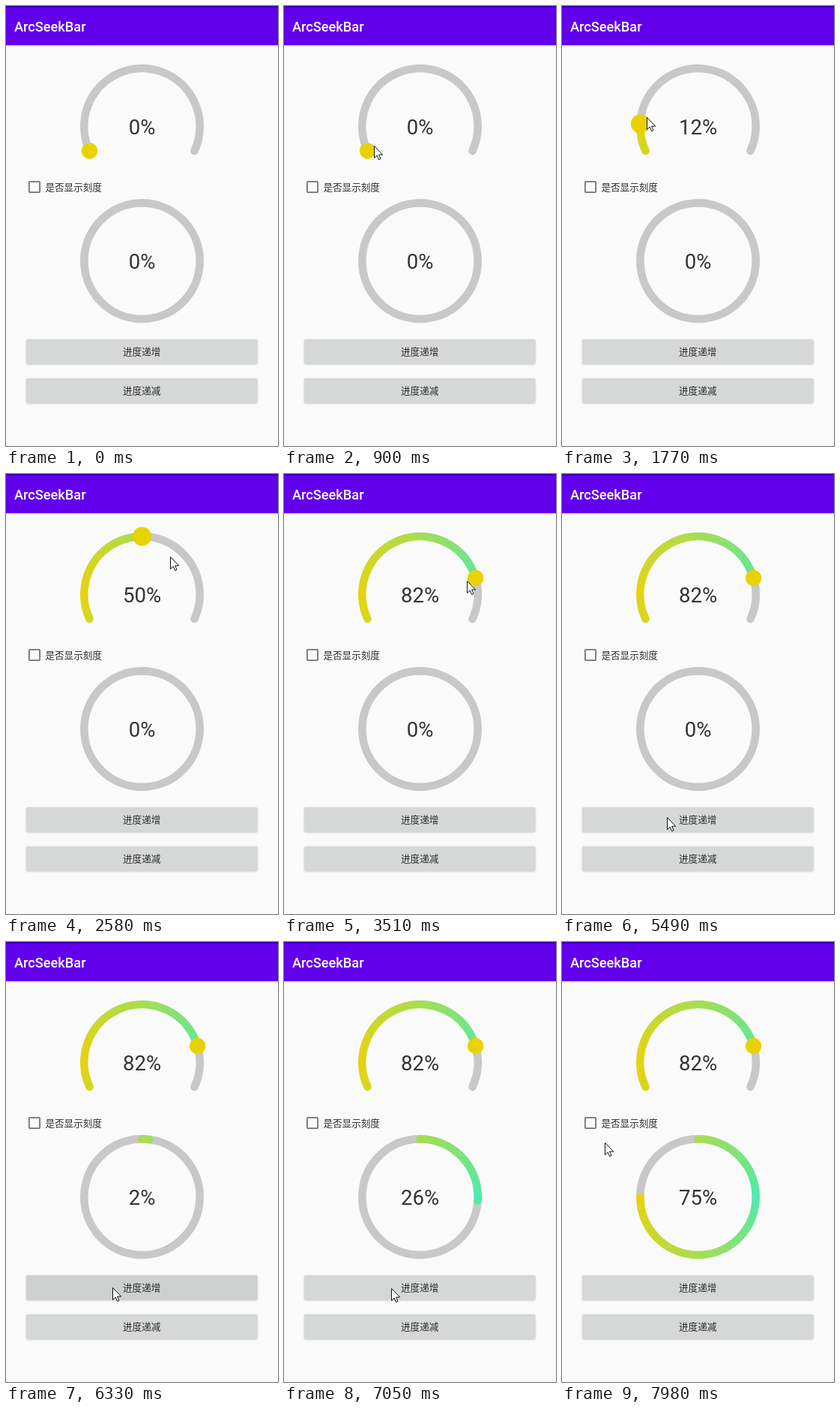
An HTML page with a canvas that plays this animation: 363x586 px, repeating every 8 s.

```html
<!DOCTYPE html>
<html lang="zh-CN">
<head>
<meta charset="utf-8">
<title>ArcSeekBar</title>
<style>
  html, body { margin: 0; width: 100%; height: 100%; overflow: hidden; background: #fafafa; }
  canvas, svg { position: absolute; left: 0; top: 0; width: 363px; height: 586px; display: block; }
  text { font-family: Roboto, "Noto Sans CJK SC", "Noto Sans CJK", sans-serif; }
  .title { font-size: 18.2px; font-weight: 500; fill: #fff; }
  .label { font-size: 12.6px; fill: #2c2c2c; }
  .percent { font-size: 27.5px; fill: #333; }
  .mid { text-anchor: middle; }
  .button { fill: #d6d7d7; filter: drop-shadow(0 1px 1px rgba(0, 0, 0, .2)); }
</style>
</head>
<body>
<canvas id="arcs"></canvas>
<svg viewBox="0 0 363 586">
  <defs>
    <linearGradient id="shade" x2="0" y2="1">
      <stop stop-opacity=".12"/><stop offset="1" stop-opacity="0"/>
    </linearGradient>
    <clipPath id="inButton"><rect x="27" y="443.8" width="308.5" height="32.8" rx="1.8"/></clipPath>
  </defs>

  <rect y="52" width="363" height="3" fill="url(#shade)"/>
  <rect width="363" height="52.2" fill="#6200ee"/>
  <rect width="363" height="2" fill="#3700b3"/>
  <text class="title" x="11" y="34">ArcSeekBar</text>

  <text class="percent mid" id="top" x="181.5" y="170.5">0%</text>
  <text class="percent mid" id="bottom" x="181.5" y="349.8">0%</text>

  <rect x="30.9" y="233.9" width="14.2" height="14.2" rx="1" fill="none" stroke="#737373" stroke-width="1.8"/>
  <text class="label" x="52.4" y="245.5">是否显示刻度</text>

  <rect class="button" id="plus" x="27" y="443.8" width="308.5" height="32.8" rx="1.8"/>
  <circle id="ripple" cx="142" cy="458" clip-path="url(#inButton)"/>
  <text class="label mid" x="181.2" y="464.7">进度递增</text>
  <rect class="button" x="27" y="495.8" width="308.5" height="32.8" rx="1.8"/>
  <text class="label mid" x="181.2" y="516.6">进度递减</text>

  <path id="cursor" d="M.5 .5V16.6L4.2 13.1L6.6 18.6L9 17.5L6.6 12.1H11.7Z" fill="#fff" stroke="#111" stroke-linejoin="round"/>
</svg>
<script>
const LOOP = 8000, CX = 181.5, RADIUS = 77.2, STROKE = 10.6;
const SHOW = 210, PRESS = 1440, TURN = 2190, DRAG_END = 3120, RELEASE = 3510;
const CLICK = 5850, FILL_START = 6080, FILL_TIME = 2850;
const $ = id => document.getElementById(id);

const clamp = v => Math.min(1, Math.max(0, v));
const phase = (t, from, to) => clamp((t - from) / (to - from));
const ease = u => u * u * (3 - 2 * u);
const rad = deg => deg * Math.PI / 180;

const canvas = $("arcs"), ctx = canvas.getContext("2d");
const scale = window.devicePixelRatio || 1;
canvas.width = 363 * scale;
canvas.height = 586 * scale;
ctx.scale(scale, scale);
ctx.lineWidth = STROKE;
ctx.lineCap = "round";

function sweepGradient(cy) {
  const g = ctx.createConicGradient(0, CX, cy);
  ["#4feaac", "#a8dd51", "#e8d30f", "#a8dd51", "#4feaac"].forEach((c, i) => g.addColorStop(i / 4, c));
  return g;
}

const makeDial = (cy, start, sweep, id) => ({ cy, start, sweep, label: $(id), paint: sweepGradient(cy) });
const seek = makeDial(160.3, 155, 230, "top");
const ring = makeDial(339.6, 270, 360, "bottom");

const angleAt = (d, percent) => rad(d.start + d.sweep * percent / 100);
const pointAt = (d, percent, r) => {
  const a = angleAt(d, percent);
  return [CX + r * Math.cos(a), d.cy + r * Math.sin(a)];
};

function strokeArc(d, from, to, style) {
  ctx.beginPath();
  ctx.arc(CX, d.cy, RADIUS, angleAt(d, from), angleAt(d, to));
  ctx.strokeStyle = style;
  ctx.stroke();
}

function drawDial(d, percent, thumb) {
  strokeArc(d, percent, 100, "#c8c8c8");
  if (percent) strokeArc(d, 0, percent, d.paint);
  if (thumb) {
    ctx.beginPath();
    ctx.arc(...pointAt(d, percent, RADIUS), thumb, 0, 7);
    ctx.fillStyle = "#e8d300";
    ctx.fill();
  }
  d.label.textContent = percent + "%";
}

// A slow pull, then a faster one
const dragged = t => 26.8 * phase(t, PRESS, TURN) + 55.2 * phase(t, TURN, DRAG_END);

// While dragging, the pointer runs ahead of the thumb and cuts inside the arc
function dragPoint(t) {
  const u = phase(t, PRESS, DRAG_END);
  return pointAt(seek, dragged(t + .22 * (t - 1350)), 62.5 + 14 * (1 - u / .7) ** 2);
}

// start, end, x, y
const moves = [
  [RELEASE, 4400, 44, 246],
  [4410, 5100, 105, 455],
  [5130, 5480, 140, 457],
  [5500, 6750, 143, 461],
  [7470, 7980, 57, 267]
];

const glide = (p, q, u) => p.map((v, i) => v + (q[i] - v) * ease(u));

function pointer(t) {
  if (t < PRESS) return glide([343, 63], dragPoint(PRESS), phase(t, SHOW, 990));
  return moves.reduce(
    (p, [from, to, ...q]) => glide(p, q, phase(t, from, to)),
    dragPoint(Math.min(t, DRAG_END))
  );
}

function drawPress(t) {
  const held = phase(t, CLICK, CLICK + 100) * (1 - phase(t, FILL_START, FILL_START + 200));
  $("plus").style.filter = held
    ? `drop-shadow(0 ${1 + held}px ${1 + held}px rgba(0, 0, 0, ${.2 + .08 * held}))` : "";
  $("ripple").setAttribute("r", 195 * phase(t, CLICK, CLICK + 350));
  $("ripple").setAttribute("fill-opacity", .1 * (1 - phase(t, FILL_START, FILL_START + 400)));
}

function render(t) {
  ctx.clearRect(0, 0, 363, 586);
  drawDial(seek, Math.round(dragged(t)), t >= PRESS && t < RELEASE ? 12.6 : 10.7);
  const fill = phase(t, FILL_START, FILL_START + FILL_TIME);
  drawDial(ring, Math.round(50 * (1 - Math.cos(Math.PI * fill))), 0);
  drawPress(t);
  const [x, y] = pointer(t).map(Math.round);
  $("cursor").style.visibility = t < SHOW ? "hidden" : "visible";
  $("cursor").setAttribute("transform", `translate(${x} ${y})`);
}

const begin = performance.now();
function tick() {
  render((performance.now() - begin) % LOOP);
  requestAnimationFrame(tick);
}
tick();
</script>
</body>
</html>
```
